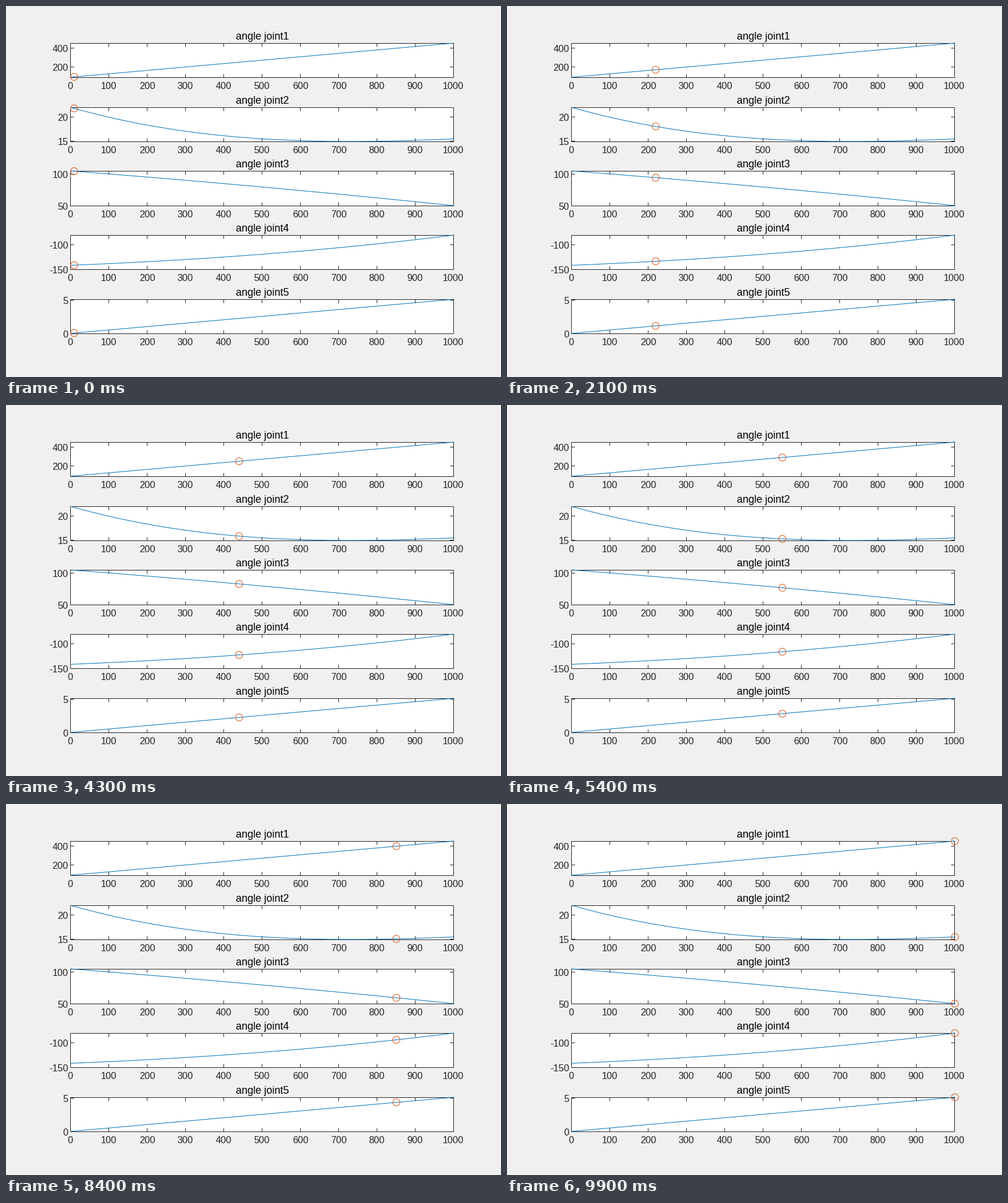
Animation, 840 px wide and 630 px high, one loop 10000 ms. Source, as a matplotlib script:

```python
import numpy as np
import matplotlib.pyplot as plt
from matplotlib.animation import FuncAnimation
from matplotlib.patches import Rectangle

W, H, DPI = 840, 630, 96
PX = 72 / DPI                       # points per pixel
LEFT, SPAN = 109.1, 651             # horizontal extent of the data
X0, X1 = 109.5, 759.5               # pixel centres of the side borders
TOP, BOTTOM, PITCH = 63.25, 121.6, 108.75
INK, BLUE, ORANGE = "#262626", "#0072BD", "#D95319"
FRAMES = 100

plt.rcParams["font.family"] = "Liberation Sans"


def joint1(t):
    return 90 + 360 * t


def joint2(t):
    return 22 - 22.57 * t + 22.04 * t**2 - 6.01 * t**3


def joint3(t):
    return 105 - 55 * t + 8 * t * (1 - t)


def joint4(t):
    return -142 + 62 * t - (30 + 6.5 * t) * t * (1 - t)


def joint5(t):
    return 5.12 * t


# curve, lower limit, upper limit, y ticks
PANELS = [
    (joint1, 90, 450, (200, 400)),
    (joint2, 14.93, 22, (15, 20)),
    (joint3, 50, 105, (50, 100)),
    (joint4, -150, -80, (-150, -100)),
    (joint5, 0, 5.12, (0, 5)),
]

fig = plt.figure(figsize=(W / DPI, H / DPI), dpi=DPI, facecolor="#F0F0F0")
ax = fig.add_axes([0, 0, 1, 1])
ax.set_xlim(0, W)
ax.set_ylim(H, 0)
ax.axis("off")


def edges(k):
    """Top and bottom of a panel on whole pixels."""
    return int(TOP + PITCH * k), int(BOTTOM + PITCH * k)


def x_pos(t):
    return LEFT + SPAN * t


def y_pos(k, value):
    _, lo, hi, _ = PANELS[k]
    top, bottom = edges(k)
    return bottom - (bottom - top) * (value - lo) / (hi - lo)


def stroke(x, y, color=INK, **kw):
    ax.plot(x, y, color=color, lw=PX, snap=False, **kw)


def tick(x, y, dx=0, dy=0):
    stroke([x, x + dx], [y, y + dy], solid_capstyle="butt")


def label(x, y, text, size=16.2, color=INK, ha="center"):
    ax.text(x, y, text, size=size * PX, color=color, ha=ha, va="baseline")


def draw_panel(k):
    curve, _, _, ticks = PANELS[k]
    y0, y1 = (y + 0.5 for y in edges(k))
    ax.add_patch(Rectangle((X0, y0), X1 - X0, y1 - y0, fc="white", ec=INK,
                           lw=PX, snap=False))

    for n, x in enumerate(np.linspace(X0, X1, 11)):
        tick(x, y0, dy=6)
        tick(x, y1, dy=-6)
        label(x - 0.3, y1 + 19.5, str(100 * n))

    for v in ticks:
        y = int(y_pos(k, v)) + 0.5
        tick(X0, y, dx=6)
        tick(X1, y, dx=-6)
        label(105.6, y + 6.5, str(v), ha="right")

    label(434.8, y0 - 6.5, f"angle joint{k + 1}", 17.6, "black")
    t = np.linspace(0.001, 1, 400)
    stroke(x_pos(t), y_pos(k, curve(t)), BLUE, zorder=3)


for k in range(len(PANELS)):
    draw_panel(k)

dots = ax.scatter([], [], s=(12 * PX) ** 2, facecolors="none",
                  edgecolors=ORANGE, linewidths=PX, zorder=4)


def update(i):
    t = (i + 1) / FRAMES
    dots.set_offsets([(x_pos(t), y_pos(k, p[0](t))) for k, p in enumerate(PANELS)])
    return [dots]


anim = FuncAnimation(fig, update, frames=FRAMES, init_func=lambda: update(0),
                     interval=100, repeat=True, repeat_delay=0)
plt.show()
```
